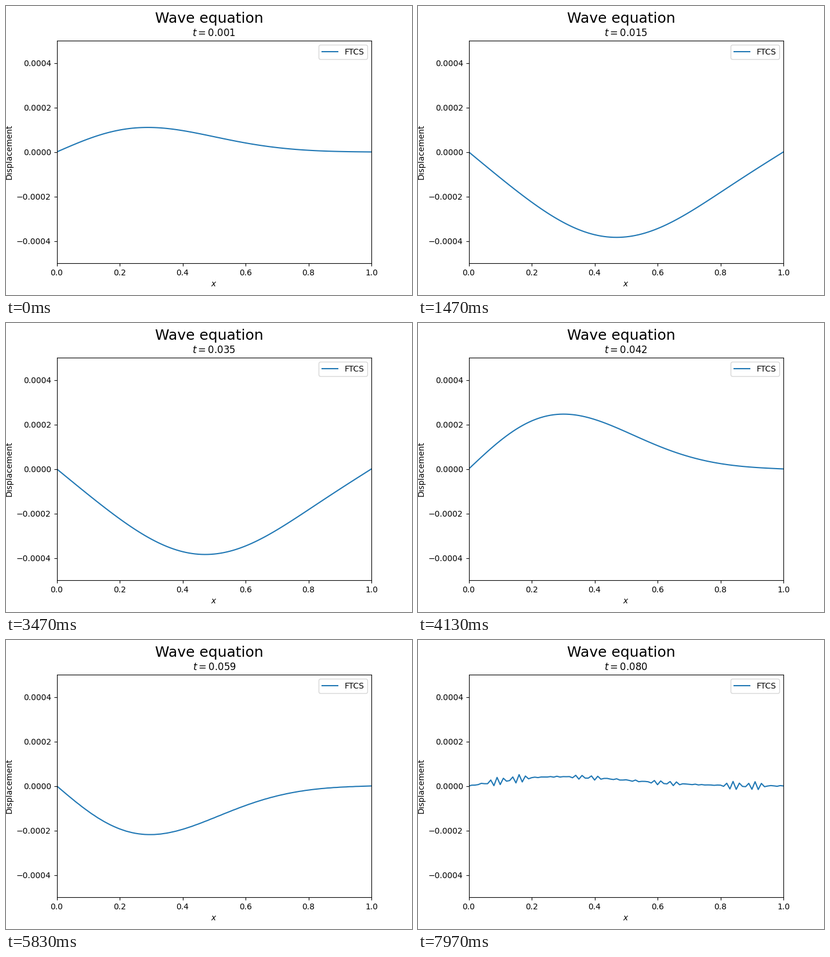
A matplotlib script that plays this animation: 700 px wide and 500 px high, repeating every 8000 ms.

```python
import numpy as np
import matplotlib.pyplot as plt
from matplotlib.animation import FuncAnimation

# Struck string, integrated with the forward-time centred-space scheme
L, V = 1.0, 100.0          # length, wave speed
N = 100                    # grid cells
A = L / N
H = 1e-6                   # time step
C, D, SIGMA = 1.0, 0.1, 0.3

FRAMES = 240
LOOP_MS = 8000
STEPS = 333                # time steps per frame
SKIP = 2                   # frames' worth of steps before the first picture


def simulate():
    """Return the displacement of the string for every frame."""
    x = np.linspace(0, L, N + 1)
    phi = np.zeros(N + 1)
    psi = C * x * (L - x) / L**2 * np.exp(-(x - D)**2 / (2 * SIGMA**2))
    psi[0] = psi[-1] = 0
    k = H * V**2 / A**2
    shots = []
    for n in range(1, FRAMES + SKIP):
        for _ in range(STEPS):
            lap = phi[2:] + phi[:-2] - 2 * phi[1:-1]
            phi = phi + H * psi
            psi[1:-1] += k * lap
        if n >= SKIP:
            shots.append(phi)
    return x, shots


x, shots = simulate()

fig, ax = plt.subplots(figsize=(7, 5), dpi=100)
fig.suptitle("Wave equation", fontsize=18)
line, = ax.plot(x, shots[0], label="FTCS")
title = ax.set_title("")
ax.set_xlim(0, L)
ax.set_ylim(-0.0005, 0.0005)
ax.set_xlabel("$x$")
ax.set_ylabel("Displacement")
ax.legend(loc="upper right")


def update(i):
    line.set_ydata(shots[i])
    title.set_text(f"$t={(i + SKIP) * STEPS * H:.3f}$")
    return line, title


anim = FuncAnimation(fig, update, frames=FRAMES, interval=LOOP_MS / FRAMES,
                     repeat=True, repeat_delay=0, blit=False)
plt.show()
```
